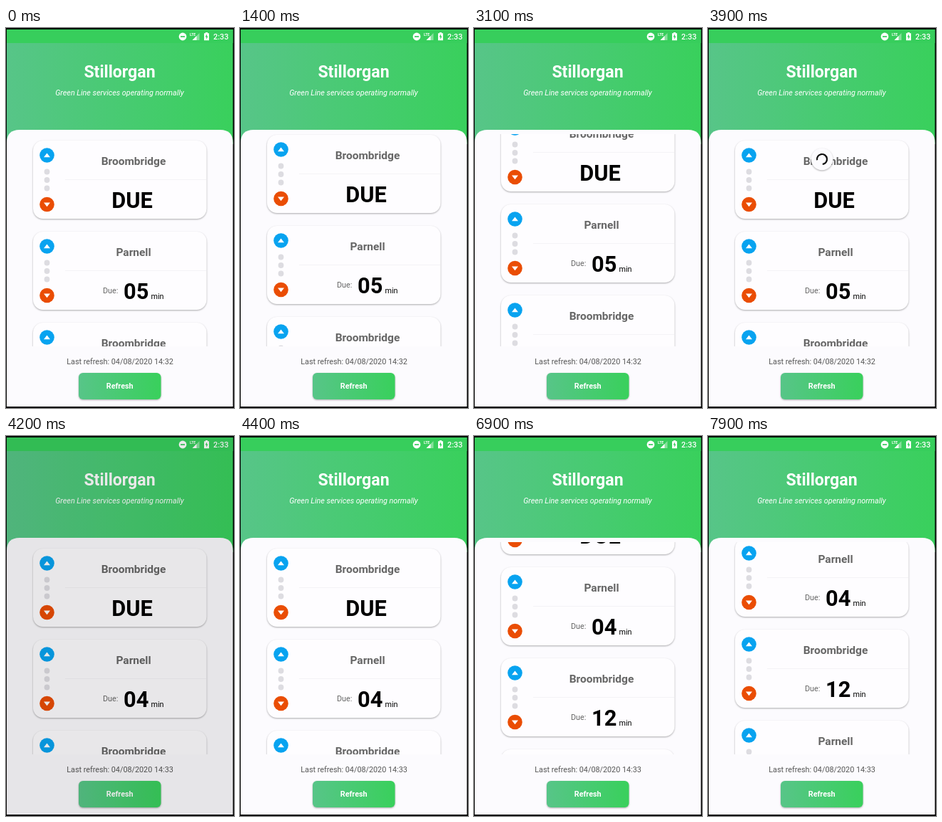
Animation of 320x530 px, one loop 8 s. Source, as an HTML page:

```html
<!DOCTYPE html>
<html lang="en">
<head>
<meta charset="utf-8">
<title>Tram times</title>
<style>
  html, body { margin: 0; width: 100%; height: 100%; overflow: hidden; background: #000; }
  svg { display: block; width: 320px; height: 530px; font-family: Roboto, sans-serif; font-size: 10.8px; }
  .bold { font-weight: 700; }
  .mid { text-anchor: middle; }
  .white { fill: #fff; }
  .grey { fill: #666; }
  .heading { font-size: 15.5px; fill: #666; }
  .big { font-size: 30.8px; }
  .raised { filter: drop-shadow(0 1.5px 1.2px rgba(0, 0, 0, .32)); }
</style>
</head>
<body>
<svg viewBox="0 0 320 530">
  <defs>
    <linearGradient id="green" x1="0" y1="0" x2="1" y2="0">
      <stop offset="0" stop-color="#57c588"/>
      <stop offset="1" stop-color="#39d05c"/>
    </linearGradient>
    <clipPath id="listArea"><rect x="30" y="148" width="260" height="296"/></clipPath>
    <g id="cardBase">
      <rect class="raised" x="38" width="243.5" height="109" rx="14" fill="#fefdff"/>
      <path d="M83 54.5H281" stroke="#f4f3f6"/>
      <circle cx="57.5" cy="20.5" r="10.3" fill="#08a3f0"/>
      <path class="white" d="M53 23.2L57.5 17.6L62 23.2Z"/>
      <g fill="#dddce1">
        <circle cx="57.5" cy="43.5" r="3.9"/>
        <circle cx="57.5" cy="55" r="3.9"/>
        <circle cx="57.5" cy="66.5" r="3.9"/>
      </g>
      <circle cx="57.5" cy="89" r="10.3" fill="#ea4d04"/>
      <path class="white" d="M53 86.6L57.5 92.2L62 86.6Z"/>
    </g>
  </defs>

  <rect width="320" height="530"/>
  <rect x="1" y="2" width="317.5" height="160" fill="url(#green)"/>
  <rect x="1" y="2" width="317.5" height="19" fill="#37ce5c"/>

  <g class="white">
    <circle cx="248" cy="12" r="5.4"/>
    <path d="M245 12H251" stroke="#37ce5c" stroke-width="1.7"/>
    <text class="bold" x="258" y="10.5" font-size="5">LTE</text>
    <path d="M271.5 7V17H261.5Z" opacity=".4"/>
    <path d="M267.5 11V17H261.5Z"/>
    <path d="M278 7.3H280V6H283V7.3H285V17.2H278Z"/>
    <path d="M282 8.5L279.6 12.6H281.2V15.8L283.5 11.6H282Z" fill="#37ce5c"/>
    <text x="291" y="16" font-weight="500">2:33</text>
    <text class="mid bold" x="159.5" y="69" font-size="23.1">Stillorgan</text>
    <text class="mid" x="159.5" y="94" font-style="italic">Green Line services operating normally</text>
  </g>

  <path d="M1 528V160Q1 142 19 142H300.500Q318.500 142 318.500 160V528Z" fill="#fcfbfe"/>
  <g clip-path="url(#listArea)">
    <g id="list"></g>
    <g id="spinner">
      <circle class="raised" r="15.300" fill="#fcfbfe"/>
      <circle id="arc" r="7" fill="none" stroke="#111" stroke-width="2.2" pathLength="100" stroke-dasharray="76 24"/>
    </g>
  </g>

  <text class="mid" id="stamp" x="160" y="469" fill="#555"></text>
  <rect class="raised" x="102" y="481" width="115.500" height="37" rx="6" fill="url(#green)"/>
  <text class="mid bold white" x="159.700" y="503">Refresh</text>
  <rect id="dim" x="1" y="2" width="317.500" height="526" opacity="0"/>
</svg>

<script>
const LOOP = 8000, STEP = 100, RELOAD = 4100;
const byId = id => document.getElementById(id);
const [list, spinner, arc, stamp, dim] = ['list', 'spinner', 'arc', 'stamp', 'dim'].map(byId);

// Each track is a list of [time, value] points.
const scroll = [
  [1300, 0], [1400, 8], [1500, 24], [1700, 58], [1900, 78], [2100, 85], [2200, 86],
  [2800, 86], [2900, 78], [3100, 38], [3300, 5], [3400, 0],
  [6300, 0], [6400, 15], [6700, 74], [6900, 101], [7000, 107], [7200, 112],
  [7500, 112], [7600, 116], [7900, 141]
];
const spinnerY = [[3400, 130], [3500, 150], [3600, 174], [3700, 188], [3800, 187], [3900, 183]];
const spinnerScale = [[3900, 1], [4100, 0]];
const dimming = [[3900, 0], [4000, .08], [4100, .13], [4200, .085], [4400, 0]];

function at(track, t) {
  const next = track.findIndex(point => point[0] > t);
  if (next < 0) return track[track.length - 1][1];
  if (next === 0) return track[0][1];
  const [t0, a] = track[next - 1], [t1, b] = track[next];
  return a + (b - a) * (t - t0) / (t1 - t0);
}

const card = (name, wait, i) => `
  <g transform="translate(0 ${157 + 127 * i})">
    <use href="#cardBase"/>
    <text class="mid bold heading" x="179" y="34">${name}</text>
    ${wait ? `
      <text class="grey" x="136" y="86">Due:</text>
      <text class="bold big wait" x="165" y="94" data-wait="${wait}"></text>
      <text x="203.500" y="94">min</text>` : `
      <text class="mid bold big" x="177" y="94">DUE</text>`}
  </g>`;

list.innerHTML = [['Broombridge', 0], ['Parnell', 5], ['Broombridge', 13], ['Parnell', 18]]
  .map(([name, wait], i) => card(name, wait, i)).join('');
const waits = list.querySelectorAll('.wait');

function draw(t) {
  const passed = t >= RELOAD ? 1 : 0;
  list.setAttribute('transform', `translate(0 ${-Math.round(at(scroll, t))})`);
  spinner.setAttribute('transform', `translate(160 ${at(spinnerY, t)}) scale(${at(spinnerScale, t)})`);
  arc.setAttribute('transform', `rotate(${170 + (t - 3900) * .5})`);
  dim.setAttribute('opacity', at(dimming, t));
  stamp.textContent = `Last refresh: 04/08/2020 14:${32 + passed}`;
  waits.forEach(el => el.textContent = String(el.dataset.wait - passed).padStart(2, '0'));
}

const start = performance.now();
function tick() {
  const t = (performance.now() - start) % LOOP;
  draw(Math.floor(t / STEP) * STEP);
  requestAnimationFrame(tick);
}
tick();
</script>
</body>
</html>
```
